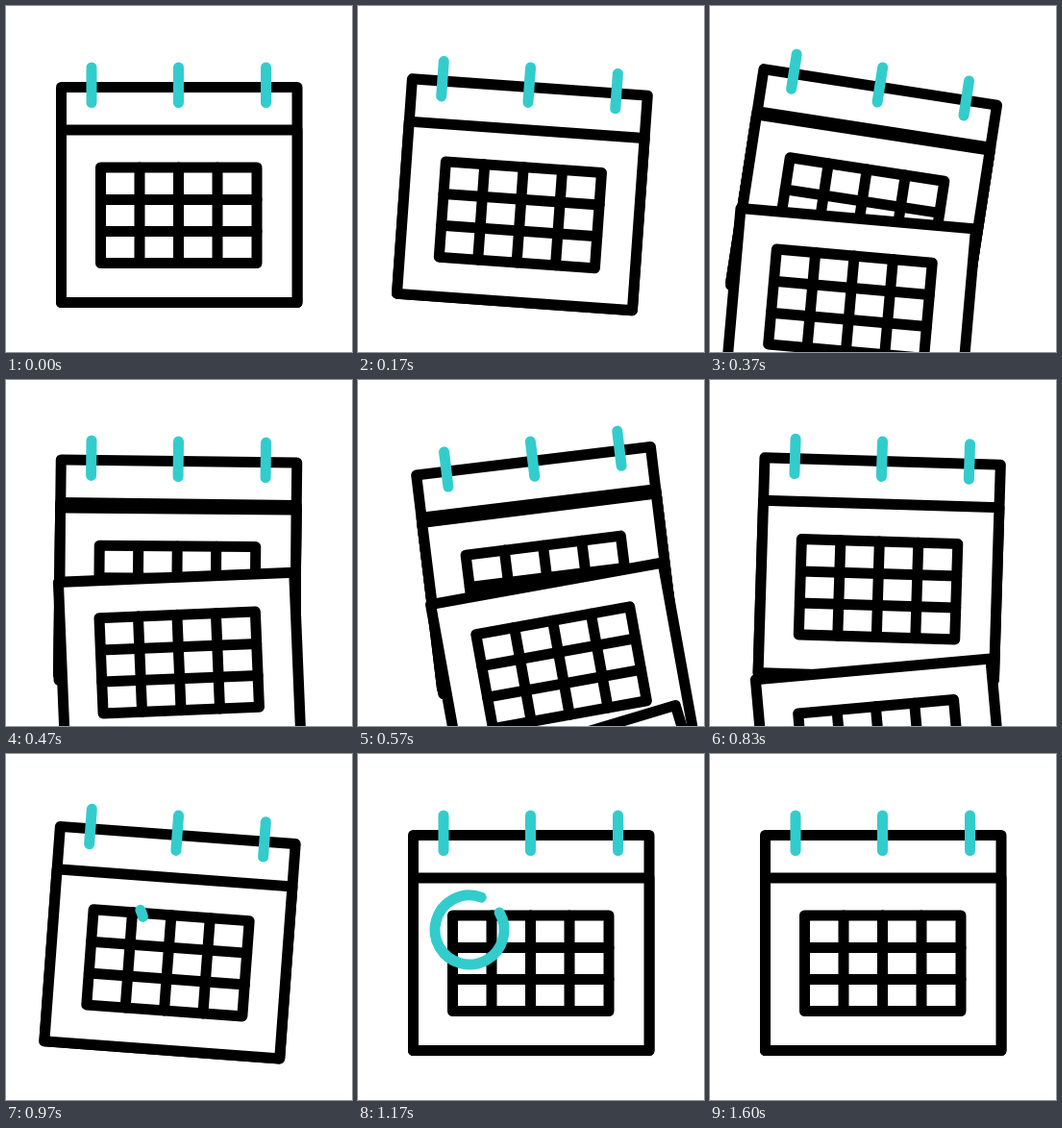
An HTML page with a canvas that plays this animation: 360 px wide and 360 px high, repeating every 1.67 s.

```html
<!DOCTYPE html>
<html lang="en">
<head>
<meta charset="utf-8">
<title>Calendar</title>
<style>
  html, body { margin: 0; height: 100%; overflow: hidden; background: #fff; }
  canvas { display: block; }
</style>
</head>
<body>
<canvas id="stage" width="360" height="360"></canvas>
<script>
const ctx = document.getElementById('stage').getContext('2d');
const LOOP = 1670;
const TEAL = '#33cccc';
const PIVOT = { x: 179.5, y: 65 };
const PAGE = { x: 57.5, y: 129, w: 245.5, h: 179.5 };
const PAGE_STARTS = [231, 345, 439, 539, 642];
const GRAVITY = 0.0048;

// [time, degrees] turning points of the swing
const SWING = [[67, 0], [310, 10.5], [620, -8], [930, 4.7], [1130, 0]];
// [time, drawn share] of the marker circle
const MARK = [[936, 0], [1236, 1], [1595, 0]];

const ease = p => (1 - Math.cos(Math.PI * p)) / 2;

function track(keys, t) {
  for (let i = 1; i < keys.length; i++) {
    const [t0, v0] = keys[i - 1], [t1, v1] = keys[i];
    if (t >= t0 && t < t1) return v0 + (v1 - v0) * ease((t - t0) / (t1 - t0));
  }
  return 0;
}

function line(x1, y1, x2, y2) {
  ctx.beginPath();
  ctx.moveTo(x1, y1);
  ctx.lineTo(x2, y2);
  ctx.stroke();
}

function box(x, y, w, h) {
  ctx.fillRect(x, y, w, h);
  ctx.strokeRect(x, y, w, h);
}

function rotate(degrees, x, y) {
  ctx.translate(x, y);
  ctx.rotate(degrees * Math.PI / 180);
  ctx.translate(-x, -y);
}

function drawPage() {
  box(PAGE.x, PAGE.y, PAGE.w, PAGE.h);
  box(98.5, 168, 162.5, 99.5);
  for (const x of [139, 179.5, 220]) line(x, 168, x, 267.5);
  for (const y of [201.5, 234.5]) line(98.5, y, 261, y);
}

function drawFallingPage(age) {
  const drop = GRAVITY * age * age;
  if (age <= 0 || drop > 450) return;
  ctx.save();
  ctx.translate(0.043 * drop, drop);
  rotate(-0.04 * drop, PAGE.x + PAGE.w / 2, PAGE.y + PAGE.h / 2);
  drawPage();
  ctx.restore();
}

function draw(t) {
  ctx.fillStyle = '#fff';
  ctx.fillRect(0, 0, 360, 360);
  ctx.lineWidth = 11;
  ctx.lineCap = ctx.lineJoin = 'round';
  ctx.save();
  rotate(t < 100 ? 0 : track(SWING, t), PIVOT.x, PIVOT.y);

  ctx.strokeStyle = '#000';
  box(57.5, 84.5, 245.5, 224);
  drawPage();
  // earlier pages lie on top
  for (const start of [...PAGE_STARTS].reverse()) drawFallingPage(t - start);

  ctx.strokeStyle = TEAL;
  for (const x of [89, 179.5, 270.5]) line(x, 64, x, 100.5);

  const share = track(MARK, t);
  if (share > 0) {
    const from = -Math.PI / 6;
    ctx.beginPath();
    ctx.arc(116, 183, 36, from, from + share * 2 * Math.PI);
    ctx.stroke();
  }
  ctx.restore();
}

function tick() {
  draw(performance.now() % LOOP);
  requestAnimationFrame(tick);
}
tick();
</script>
</body>
</html>
```
